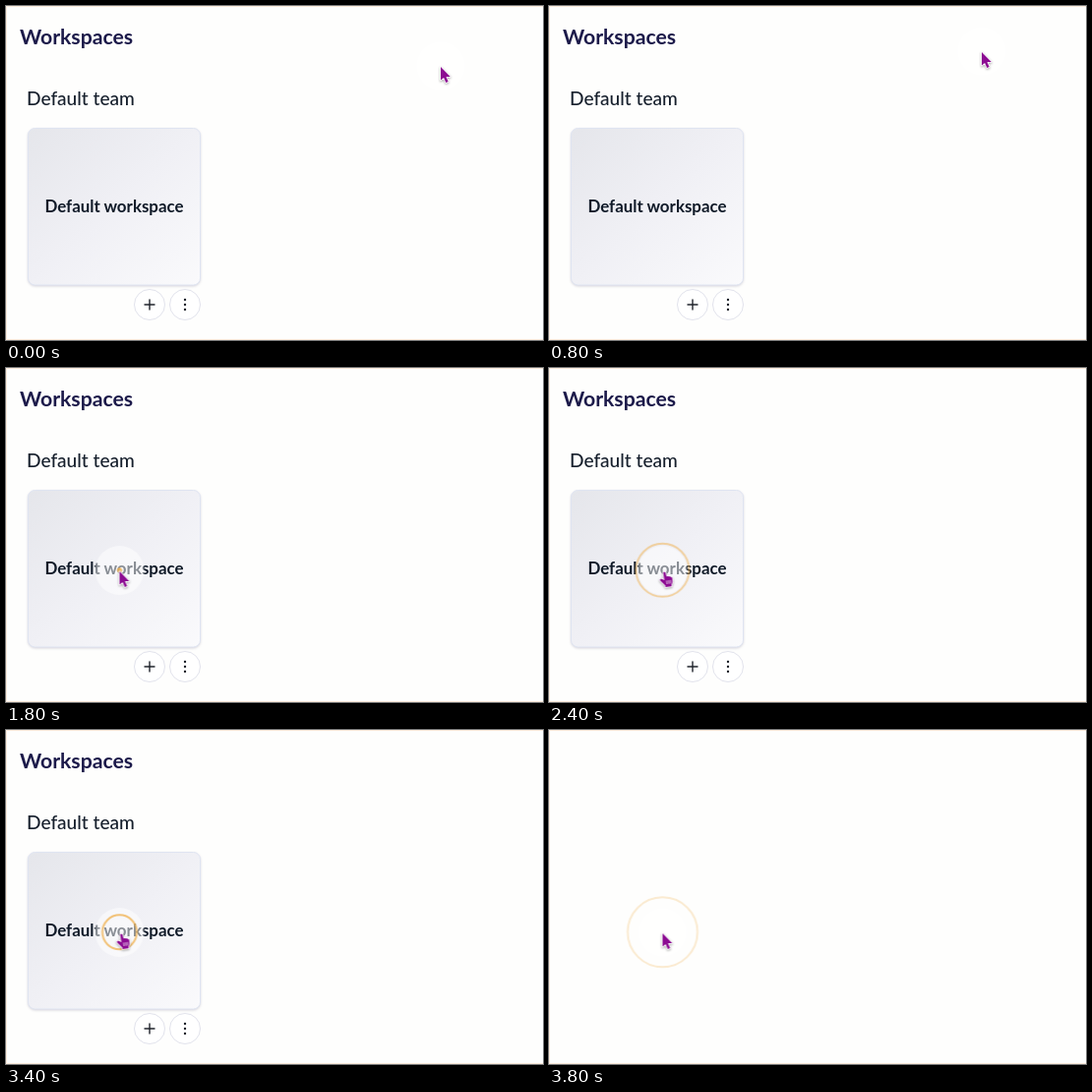
An HTML page that plays this animation: 546x340 px, repeating every 4 s.

```html
<!DOCTYPE html>
<html lang="en">
<head>
<meta charset="utf-8">
<title>Workspaces</title>
<style>
  html, body { margin: 0; width: 100%; height: 100%; overflow: hidden; background: #fefefd; }
  svg { display: block; width: 546px; height: 340px; }
  text { font-family: Lato, "Open Sans", sans-serif; }

  .heading { font-size: 21.2px; font-weight: 700; fill: #1c1a4a; }
  .team { font-size: 19.1px; font-weight: 500; fill: #17202d; }
  .name { font-size: 16.9px; font-weight: 700; fill: #101a28; text-anchor: middle; }
  .card { fill: url(#cardFill); stroke: #dfe4f1; filter: drop-shadow(0 1px 1px #1c1a4a2b); }
  .button { fill: #fff; stroke: #e2e3ec; }
  .icon { fill: none; stroke: #20242c; stroke-width: 1.4; stroke-linecap: round; }
  .frame { fill: none; stroke: #fcecdd; }
  .halo { fill: #fff; opacity: .5; }
  .ring { fill: none; stroke: #f0b04c; stroke-width: 2; }
  .pointer { fill: #8c0c92; stroke: #fff; stroke-width: 1.6; stroke-linejoin: round;
             paint-order: stroke; filter: drop-shadow(0 1px 1px #0005); }

  .page, .mouse, .ring, .arrow, .hand { animation: 4s step-end infinite; }
  .page { animation-name: leave; }
  .mouse { animation-name: travel; }
  .ring { animation-name: click; }
  .arrow { animation-name: arrow; }
  .hand { animation-name: hand; }

  @keyframes leave {
    0% { visibility: visible; }
    90%, 100% { visibility: hidden; }
  }
  @keyframes travel {
    0% { transform: translate(442px, 62px); }
    5% { transform: translate(444px, 58px); }
    10% { transform: translate(446.5px, 52px); }
    15% { transform: translate(446px, 47px); }
    20% { transform: translate(440px, 47px); }
    25% { transform: translate(265px, 132px); }
    30% { transform: translate(148px, 194px); }
    35% { transform: translate(130px, 204px); }
    40%, 100% { transform: translate(115.5px, 207px); }
  }
  @keyframes click {
    0%, 70% { r: 0; opacity: 0; }
    45%, 75% { r: 1.5px; opacity: .9; }
    50%, 80% { r: 10px; opacity: .85; }
    55%, 85% { r: 17.5px; opacity: .75; }
    60%, 90% { r: 27px; opacity: .5; }
    65%, 95%, 100% { r: 35.5px; opacity: .25; }
  }
  @keyframes arrow {
    0%, 90%, 100% { visibility: visible; }
    50% { visibility: hidden; }
  }
  @keyframes hand {
    0%, 90%, 100% { visibility: hidden; }
    50% { visibility: visible; }
  }
</style>
</head>
<body>
<svg viewBox="0 0 546 340">
  <defs>
    <linearGradient id="cardFill" x1="0" y1="0" x2="1" y2="1">
      <stop offset="0" stop-color="#e5e6eb"/>
      <stop offset=".5" stop-color="#f0f0f5"/>
      <stop offset="1" stop-color="#fafafc"/>
    </linearGradient>
  </defs>

  <path class="frame" d="M546 .5H.5V339.5H546"/>

  <g class="page">
    <text class="heading" x="14" y="39">Workspaces</text>
    <text class="team" x="21" y="101">Default team</text>
    <rect class="card" x="22.5" y="124.5" width="175" height="159.5" rx="7"/>
    <text class="name" x="110" y="209.5">Default workspace</text>
    <circle class="button" cx="146" cy="304" r="15.5"/>
    <path class="icon" d="M141 304h10M146 299v10"/>
    <circle class="button" cx="182" cy="304" r="15.5"/>
    <path class="icon" style="stroke-width:2.4" d="M182 299h0M182 304h0M182 309h0"/>
  </g>

  <g class="mouse">
    <circle class="halo" cy="-1" r="25"/>
    <circle class="ring" cy="-1.2" r="0"/>
    <path class="pointer arrow" d="M0 0V13.6L3.1 10.9L5.3 16L7.7 15L5.5 10H9.8Z"/>
    <g class="hand">
      <path class="pointer" d="M.6 1.2Q1.6-.3 2.9 1.2L4.2 5.4Q5.4 4.3 6.3 5.4Q7.5 4.6 8.2 5.8Q9.5 5.4 9.8 7L10.2 10.6Q10.2 12 9.2 13.2V15.2L2.8 16V14.4L-2.4 9.4Q-3.2 7.8-1.4 7.6L1.8 9Z"/>
      <path d="M4 9.4l.6 3.6M6 9.1l.5 3.6M8 8.8l.3 3.6" fill="none" stroke="#fff" stroke-width=".7"/>
    </g>
  </g>
</svg>
</body>
</html>
```
